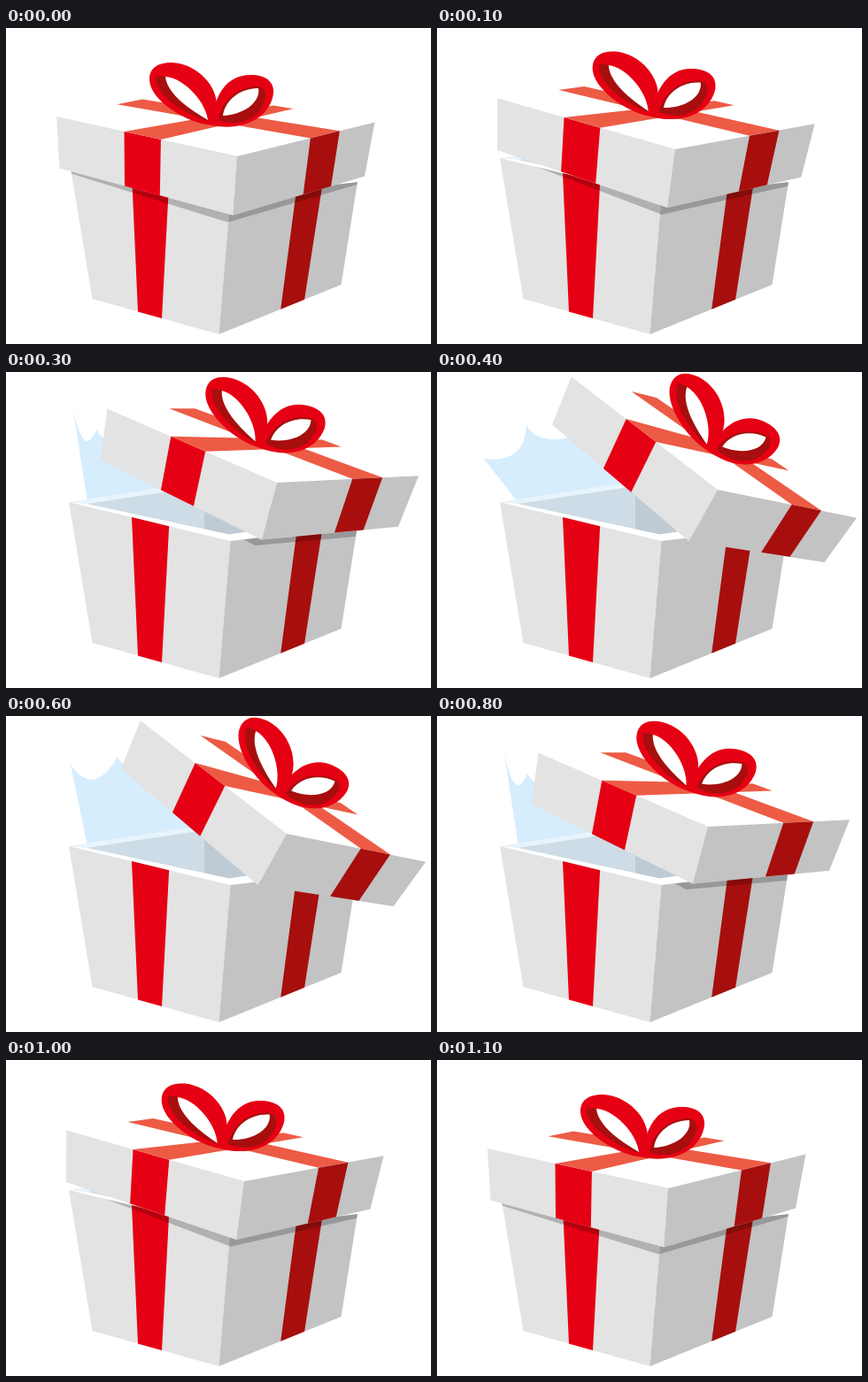
Recreate the animation shown at these times as an HTML page. Size 480 by 357 pixels, loop 1.2 s.

```html
<!DOCTYPE html>
<html lang="en">
<head>
<meta charset="utf-8">
<title>Gift box</title>
<style>
  html, body { margin: 0; width: 100%; height: 100%; overflow: hidden; background: #fff; }
  svg { display: block; width: 100vw; height: 100vh; }

  .light { fill: #e3e3e3; }
  .shade { fill: #c3c3c3; }
  .red { fill: #e60013; }
  .dark { fill: #a60f0e; }
  .coral { fill: #ed5b45; }
  .white { fill: #fff; }
  .paper { fill: #d6edfe; }
  .rim { fill: #e8f4fb; }
  .inside { fill: #cddce6; }
  .corner { fill: #becbd5; }
  .shadow { fill: #000; fill-opacity: .22; }
</style>
</head>
<body>
<svg viewBox="0 0 480 357" preserveAspectRatio="none">
  <clipPath id="faces"><path id="outline"/></clipPath>
  <path id="paper" class="paper"/>
  <g id="box"></g>
  <g clip-path="url(#faces)"><g id="cast"></g></g>
  <g id="lid">
    <g id="cover"></g>
    <g id="bow">
      <path class="red" d="M233 110C205 108 162 82 162 58C162 45 172 39 187 39C216 40 239 66 238 88Q238 104 233 110Z"/>
      <path class="dark" d="M228 105C205 99 169 77 169 55C190 50 225 78 228 105Z"/>
      <path class="white" d="M228 104C209 93 182 75 180 55C200 56 225 82 228 104Z"/>
      <path class="red" d="M232 110C234 78 248 53 276 53C294 53 303 61 302 74C298 101 269 117 232 110Z"/>
      <path class="dark" d="M240 104C244 78 266 66 284 66Q294 67 293 78C288 103 264 112 240 104Z"/>
      <path class="white" d="M245 99C247 82 264 68 285 68C288 84 268 98 245 99Z"/>
    </g>
  </g>
</svg>
<script>
  const STEP_MS = 100, STEPS = 12;
  const $ = id => document.getElementById(id);
  const mix = (a, b, t) => a.map((v, i) => v + (b[i] - v) * t);
  const shift = ([x, y], dx, dy) => [x + dx, y + dy];
  const poly = (...points) => "M" + points.join("L") + "Z";

  function add(parent, kind, ...points) {
    const path = document.createElementNS("http://www.w3.org/2000/svg", "path");
    path.setAttribute("class", kind);
    path.setAttribute("d", poly(...points));
    $(parent).append(path);
  }

  // A ribbon crosses a face from one edge to the opposite one.
  function ribbon(parent, kind, [a, b], [c, d], [from, to], [from2, to2] = [from, to]) {
    add(parent, kind, mix(a, b, from), mix(a, b, to), mix(c, d, to2), mix(c, d, from2));
  }

  function drawBox() {
    const left = [71, 147], front = [253.5, 191], right = [397, 174], back = [226, 123];
    const left2 = [97.5, 306], front2 = [240.5, 346], right2 = [378.5, 290];
    const inner = [91, 149], innerBack = [224, 129], innerRight = [300, 160];
    const innerFront = [252, 183.5], innerSide = [272, 180.5];

    add("box", "rim", left, back, right, front);
    add("box", "inside", inner, innerBack, innerRight, innerSide, innerFront);
    add("box", "corner", innerBack, innerRight, innerSide, innerFront, [224, 178]);
    add("box", "white", left, inner, innerFront, innerSide, innerRight, right, front);
    add("box", "light", left, front, front2, left2);
    add("box", "shade", front, right, right2, front2);
    ribbon("box", "red", [left, front], [left2, front2], [.389, .62], [.36, .549]);
    ribbon("box", "dark", [front, right], [front2, right2], [.52, .722], [.505, .7]);
    $("outline").setAttribute("d", poly(left, front, right, right2, front2, left2));
  }

  const hub = [261, 145];   // front corner of the lid, its turning point

  function drawLid() {
    const left = [57, 100], right = [416.5, 106.5], back = [202, 71];
    const left2 = [60.5, 158.5], front2 = [256.5, 211.5], right2 = [405, 167.5];
    const wide = [.375, .578], far = [.533, .745];

    add("cast", "shadow", left2, front2, right2,
      shift(right2, 0, 7), shift(front2, -6, 8), shift(left2, 0, 2));
    add("cover", "white", left, back, right, hub);
    ribbon("cover", "coral", [left, back], [hub, right], [.472, .669], far);
    ribbon("cover", "coral", [left, hub], [back, right], wide, [.466, .571]);
    add("cover", "light", left, hub, front2, left2);
    add("cover", "shade", hub, right, right2, front2);
    ribbon("cover", "red", [left, hub], [left2, front2], wide);
    ribbon("cover", "dark", [hub, right], [front2, right2], far);
  }

  // Lid from shut to open: shift of the front corner and turn in degrees.
  const poses = [[0, 0, 0], [8, -8, 3.6], [16, -16, 7.2], [45, -20, 11.1], [56, -12, 25.3]];

  // Paper swinging upright: tip, dip and second peak.
  const swing = [
    [[53, 98], [99, 104], [101, 60]],
    [[73, 55], [99, 93], [126, 46]],
    [[76, 42], [88, 100], [102, 65]]
  ];
  const hinge = [92, 148];

  function paperPath(phase, growth) {
    const i = Math.min(Math.floor(phase * 2), 1);
    const [tip, dip, peak] = swing[i].map((p, n) =>
      mix(hinge, mix(p, swing[i + 1][n], phase * 2 - i), growth));
    const sag = shift(peak, 12 * growth, 22 * growth);
    const end = shift(peak, 49 * growth, 14 * growth);
    return `M${hinge}L${tip}Q${dip} ${peak}Q${sag} ${end}L226 126Z`;
  }

  function render(now) {
    const step = Math.floor(now / STEP_MS) % STEPS;
    const level = Math.min(step, STEPS - 1 - step, 4);
    const [x, y, turn] = poses[level];
    const pose = `translate(${x} ${y}) rotate(${turn} ${hub})`;
    $("lid").setAttribute("transform", pose);
    $("cast").setAttribute("transform", pose);
    $("cast").setAttribute("visibility", level < 4 ? "visible" : "hidden");

    const phase = level < 4 ? 1 : (step - 4) / 4;
    const growth = Math.min(Math.max((level - 1) / 2, 0), 1);
    $("paper").setAttribute("d", paperPath(phase, growth));
  }

  drawBox();
  drawLid();
  const start = performance.now();
  function loop() {
    render(performance.now() - start);
    requestAnimationFrame(loop);
  }
  loop();
</script>
</body>
</html>
```
